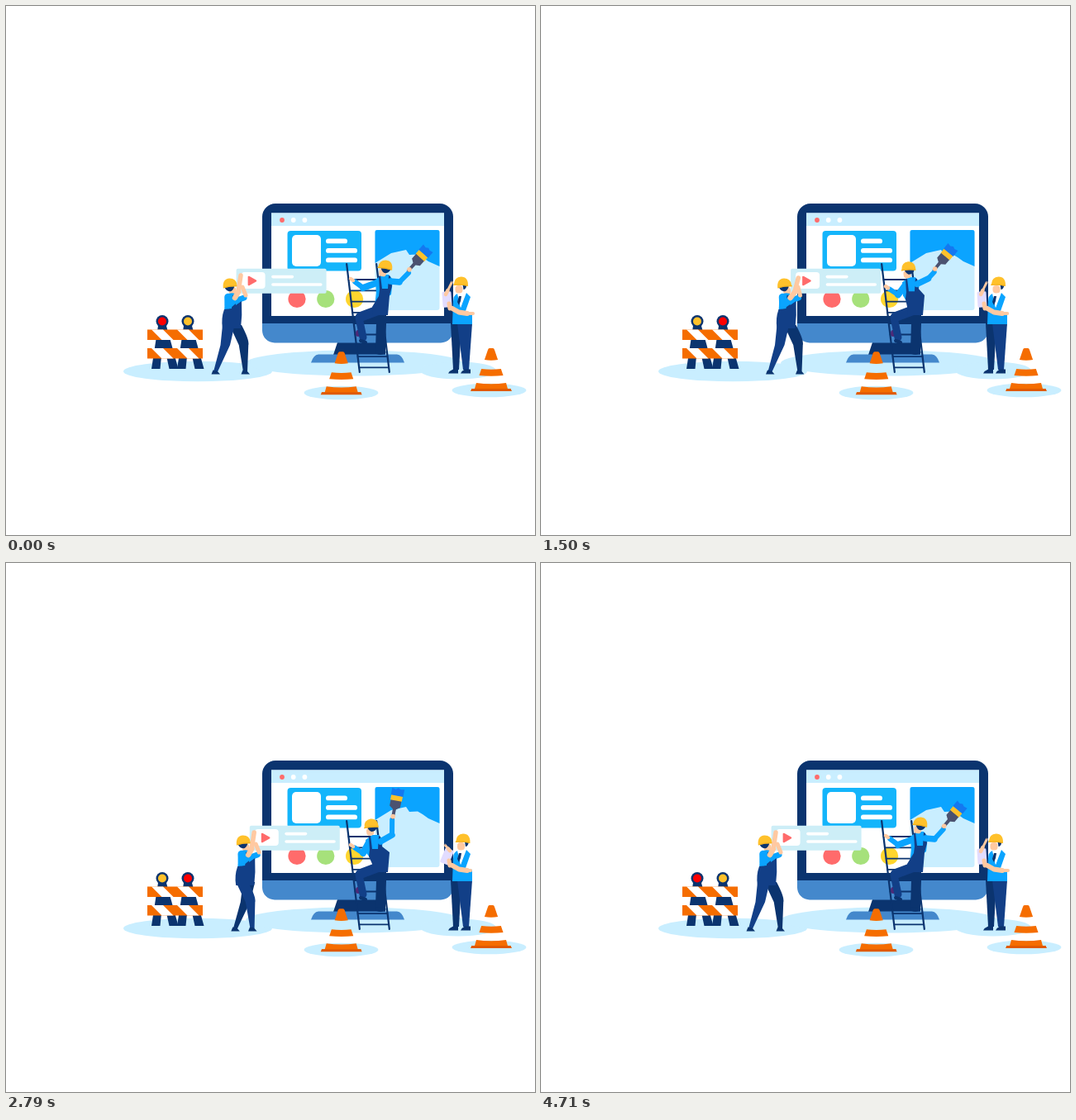
An HTML page with a canvas that plays this animation: 640x640 px, repeating every 4780 ms.

```html
<!DOCTYPE html>
<html lang="en">
<head>
<meta charset="utf-8">
<title>Site under construction</title>
<style>
html, body { margin: 0; height: 100%; overflow: hidden; background: #fff; }
canvas { display: block; width: 640px; height: 640px; }
</style>
</head>
<body>
<canvas id="stage"></canvas>
<script>
const LOOP = 4780, STEP = LOOP / 67;
const NAVY = '#0b346f', DENIM = '#123f87', BLUE = '#0ba4ff', PALE = '#c9eeff', STEEL = '#4488cc',
  SKIN = '#ffc9a1', YELLOW = '#ffc12b', ORANGE = '#f56d00', RED = '#ff6b6b', WHITE = '#fff';

const canvas = document.getElementById('stage');
const c = canvas.getContext('2d');
const ratio = window.devicePixelRatio || 1;
canvas.width = canvas.height = 640 * ratio;

// ---- drawing helpers ----
function shape(color, d) {
  c.fillStyle = color;
  c.fill(new Path2D(d));
}
function box(color, x, y, w, h, r = 0) {
  c.fillStyle = color;
  c.beginPath();
  c.roundRect(x, y, w, h, r);
  c.fill();
}
function oval(color, x, y, rx, ry = rx) {
  c.fillStyle = color;
  c.beginPath();
  c.ellipse(x, y, rx, ry, 0, 0, 7);
  c.fill();
}
function limb(color, width, ...points) {
  c.strokeStyle = color;
  c.lineWidth = width;
  c.lineCap = c.lineJoin = 'round';
  c.stroke(new Path2D('M' + points.map(p => p.join()).join('L')));
}
function placed(x, y, angle, draw) {
  c.save();
  c.translate(x, y);
  c.rotate(angle * Math.PI / 180);
  draw();
  c.restore();
}

// ---- motion helpers ----
const linear = (t, from, to) => Math.min(1, Math.max(0, (t - from) / (to - from)));
const ramp = (t, from, to) => {
  const u = linear(t, from, to);
  return u * u * (3 - 2 * u);
};
const there = (t, a, b, back, end) => ramp(t, a, b) - ramp(t, back, end);
const mix = (a, b, u) => a.map((v, i) => v + (b[i] - v) * u);

// ---- scenery ----
function cone(x, y) {
  const half = h => 21 - h * 0.34;
  const band = (bottom, top) => shape(ORANGE, `M${-half(bottom)} ${-bottom}Q0 ${1.5 - bottom} ${half(bottom)} ${-bottom}`
    + `L${half(top)} ${-top}Q0 ${1.5 - top} ${-half(top)} ${-top}Z`);
  placed(x, y, 0, () => {
    band(38, 50);
    shape(ORANGE, 'M-4 -50Q-3.5 -52 -2 -52H2Q3.5 -52 4 -50L3 -47H-3Z');
    band(19, 27);
    shape(ORANGE, 'M-18 -10Q0 -7.5 18 -10L20 -3H24V-2H-24V-3H-20Z');
    shape('#e05a00', 'M-23.5 -3H23.5L25 0H-25Z');
  });
}

function barricade(t) {
  const swapped = Math.floor(t / 750) % 2;
  [189, 220].forEach((x, i) => placed(x, 0, 0, () => {
    shape(NAVY, 'M-5 387H5L19.5 439H8.5L3 414H0L-2.5 439H-13Z');
    oval(NAVY, 0, 381.5, 7.5);
    oval(i === swapped ? '#ff0000' : YELLOW, 0, 381.5, 5);
  }));
  for (const y of [391.5, 414]) {
    box(ORANGE, 171, y, 67, 12.5);
    for (const x of [176, 207]) shape(WHITE, `M${x} ${y}h14l12.5 12.5h-14z`);
  }
}

function monitor() {
  shape(NAVY, 'M401 407H457L459 422H396Z');
  shape(STEEL, 'M378 421.5H473Q479 422 482 431.5H369Q372 422 378 421.5Z');
  box(NAVY, 310, 239, 231, 145, [16, 16, 0, 0]);
  box(STEEL, 310, 384, 231, 23.5, [0, 0, 15, 15]);
  box(WHITE, 321, 250.5, 209, 124.5);
  box(PALE, 321, 250.5, 209, 15.5);
  [RED, WHITE, WHITE].forEach((color, i) => oval(color, 334 + 13.7 * i, 259, 2.9));

  box('#14b5fb', 340.5, 272, 89.5, 48.5, 4);
  box(WHITE, 346, 277, 35, 38, 5);
  [26, 38, 38].forEach((w, i) => box(WHITE, 387, 281.5 + 11.5 * i, w, 5.8, 2.9));

  box(PALE, 446.5, 271, 78, 97, 3);
  shape(BLUE, 'M446.5 273Q446.5 271 449 271H522Q524.5 271 524.5 273V315L511 309L504 304'
    + 'L498 300.5L488 301L484 295L466 299L446.5 311Z');
  [RED, '#a6e17b', '#ffd52e'].forEach((color, i) => oval(color, 352 + 34.8 * i, 354.5, 10.6));
}

function ladder() {
  const lean = y => 412 + (y - 311) * 0.12;
  for (let y = 331; y < 440; y += 13.3) limb(NAVY, 1.8, [lean(y), y], [lean(y) + 36, y]);
  for (const x of [0, 36]) limb(NAVY, 2.2, [lean(312) + x, 312], [lean(443) + x, 443]);
}

function panel(x) {
  box('#cdeef7', x, 317.8, 109, 30, 2);
  box(WHITE, x + 6, 322, 29, 20, 4);
  shape(RED, `M${x + 14} 328q0 -2 2 -1l8 4.5q1.5 1 0 2l-8 4.5q-2 1 -2 -1z`);
  box(WHITE, x + 42.5, 325.8, 27, 3.6, 1.8);
  box(WHITE, x + 42.5, 335.2, 61.5, 3.6, 1.8);
}

// ---- people ----
function head(x, y, facing, tilt, hairy) {
  placed(x, y, tilt, () => {
    c.scale(facing, 1);
    box(SKIN, -2, 3, 9, 9.5, 4);
    shape(NAVY, hairy ? 'M-7 2H5Q5 5 1 8Q-5 9 -7 2Z' : 'M-7 2H-2L-3 8Q-6 8 -7 2Z');
    shape(YELLOW, 'M-8.5 4Q-9 -7.5 0 -7.5Q8 -7 8.5 1L9.5 3Q1 2 -8.5 4Z');
    limb('#f0aa16', 0.8, [-7.5, 3.2], [0, 2], [8.5, 2.4]);
  });
}

function leg(color, hx, hy, fx, fy) {
  const kx = (hx + fx) / 2 + 4, ky = (hy + fy) / 2 - 4;
  shape(color, `M${hx - 7.5} ${hy}H${hx + 7}Q${kx + 7} ${ky - 6} ${kx + 5.5} ${ky}`
    + `L${fx + 2.5} ${fy}H${fx - 2.5}L${kx - 6} ${ky}Z`);
  shape(NAVY, `M${fx - 3} ${fy - 2}L${fx + 2} ${fy - 1}L${fx + 5.5} ${fy + 3}H${fx - 5}Z`);
}

function drawPainter(t) {
  const lean = there(t, 620, 1800, 2900, 4150);
  const swing = (1 + Math.cos((t - 700) / LOOP * 2 * Math.PI)) / 2;
  const [x, y] = mix([457, 331], [445, 335], lean);
  const grip = [417, 330 + 11 * lean], elbow = [432, 341 + 10 * lean];
  const arm = mix([476, 334], [467, 329], lean);
  const hand = [480.8 + 9 * swing - 13 * lean, 306 + 16 * swing];

  limb(NAVY, 12, [454, 368], [454, 384], [453, 416]);
  limb(NAVY, 5, [450, 419], [457, 419]);
  oval('#4d2a78', 426, 396, 3, 4);
  limb(DENIM, 9, [427, 377], [432, 401]);
  limb(DENIM, 12, [453, 367], [429, 376]);
  limb(NAVY, 4, [429, 405], [435, 407]);

  limb(BLUE, 8, [x - 6, y + 3], elbow);
  limb(BLUE, 6, elbow, [grip[0] + 5, grip[1] + 3.5]);
  limb(SKIN, 4.5, [grip[0] + 3, grip[1] + 2], grip);

  shape(BLUE, `M${x - 10} ${y}L${x - 2} ${y - 6}H${x + 6}L${x + 11} ${y}L${x + 9} ${y + 18}L446 364L${x - 9} ${y + 16}Z`);
  shape(DENIM, `M${x - 4} ${y - 5}L${x - 2} ${y + 11}H${x + 5}L${x + 6} ${y - 5}L${x + 8} ${y - 4}`
    + `L${x + 10} ${y + 8}L464 350L462 374H444L443 364L${x - 6} ${y + 20}L${x - 5} ${y + 12}L${x - 6} ${y - 4}Z`);

  limb(BLUE, 7.5, [x + 8, y + 2], arm);
  limb(BLUE, 6, arm, [hand[0] - 1, hand[1] + 4]);
  placed(...hand, 9.5 + 40 * swing, () => {
    shape('#4b5270', 'M-1.8 3L-2 -9L-6.5 -12V-20H6.5V-12L2 -9L1.8 3Z');
    box(YELLOW, -7, -26, 14, 6.5);
    shape('#1478f0', 'M-7.5 -25.5V-34L-3 -33L0 -35L3 -33.5L7.5 -34.5V-25.5Z');
  });
  oval(SKIN, ...hand, 2.8);
  head(...mix([459, 315], [442, 317], lean), -1, 6 - 14 * lean, true);
}

const carried = t => 23.5 * there(t, 0, 1140, 2400, 3430);

function drawCarrier(t) {
  const dx = carried(t), reach = there(t, 1210, 1900, 1950, 2400);
  const walk = linear(t, 0, 1140) - linear(t, 2400, 3500);
  const stride = 18 * Math.cos(walk * 2 * Math.PI);
  const wrist = [281 + 6 * reach, 346 + reach];
  placed(dx, 0, 0, () => {
    leg(NAVY, 278, 386, 271.5 + stride, 442.5);
    leg(DENIM, 269.5, 386, 271.5 - stride, 442.5);
    limb(BLUE, 7, [277, 357], [288, 353]);
    limb(SKIN, 5, [290, 350], [286 + 4 * reach, 340]);
    head(271, 337, 1, -4, true);
    shape(BLUE, 'M265 350Q272 345 280 349L285 358L284 372H264Z');
    shape(DENIM, 'M264 367L273 366L274 350H277L278 362L285 357Q286 374 284 390H262Q260 378 264 367Z');
    limb(BLUE, 8.5, [268.5, 352], [269, 362], [275 + 3 * reach, 357]);
    limb(SKIN, 6.5, [277 + 3 * reach, 353], wrist);
    limb(SKIN, 5.5, wrist, [284 + 10 * reach, 326 + 8 * reach]);
  });
}

function drawManager(t) {
  const nod = 3 * there(t, 0, 1000, 2600, 3300);
  const write = there(t, 1400, 2500, 3300, 4700);
  const palm = 567 - 3 * there(t, 1350, 1800, 4100, 4600);
  const tip = mix([539.5, 334], [531, 341], write), wrist = mix([532, 349], [537, 348], write);
  shape(NAVY, 'M538 384H551L548 440H541Z');
  shape(DENIM, 'M546 384H564L560 440H553Z');
  shape(NAVY, 'M535 444.5Q537 441 541 439.5H547V444.5ZM550 444.5Q552 441 555 439.5H562V444.5Z');
  head(550.5 + nod, 335, -1, 0, false);
  shape(WHITE, 'M545 349L556 347L561 352L558 372H544Z');
  shape(BLUE, 'M546 348Q541 350 541 358L540 385H564L564 371L556 369L562 352L557 347L550 365Z');
  shape(WHITE, 'M547 349L556 347L550 365Z');
  shape(NAVY, 'M548 351L551 351L550 357L548 362L546 358Z');
  placed(533.5, 355, 26 * write - 4, () => box('#e2dcff', -5.5, -9.5, 11, 19, 1.5));
  limb(SKIN, 5, [536, 360], [537, 366]);
  limb(SKIN, 6, [540, 366], [548, 370.5], [558, 372]);
  limb(SKIN, 4, [557, 372], [palm - 2, 372]);
  limb(SKIN, 4.5, wrist, mix(wrist, tip, 0.33));
  limb(SKIN, 2.8, wrist, tip);
  limb(NAVY, 0.9, tip, [tip[0] - 0.5, tip[1] - 2.5]);
}

function render(t) {
  c.setTransform(ratio, 0, 0, ratio, 0, 0);
  box(WHITE, 0, 0, 640, 640);
  oval(PALE, 232, 442, 90, 12.3);
  oval(PALE, 421, 432, 131, 15.5);
  oval(PALE, 547, 441, 46, 10.5);
  oval(PALE, 405.5, 468, 45, 8.3);
  oval(PALE, 584.5, 465, 45, 8.3);
  barricade(t);
  monitor();
  panel(278.6 + carried(t));
  ladder();
  drawPainter(t);
  cone(405.7, 470.3);
  drawCarrier(t);
  drawManager(t);
  cone(587, 466);
}

function tick(now) {
  const frame = Math.floor((now % LOOP + 4) / STEP) % 67;
  render(frame * STEP);
  requestAnimationFrame(tick);
}
requestAnimationFrame(tick);
</script>
</body>
</html>
```
